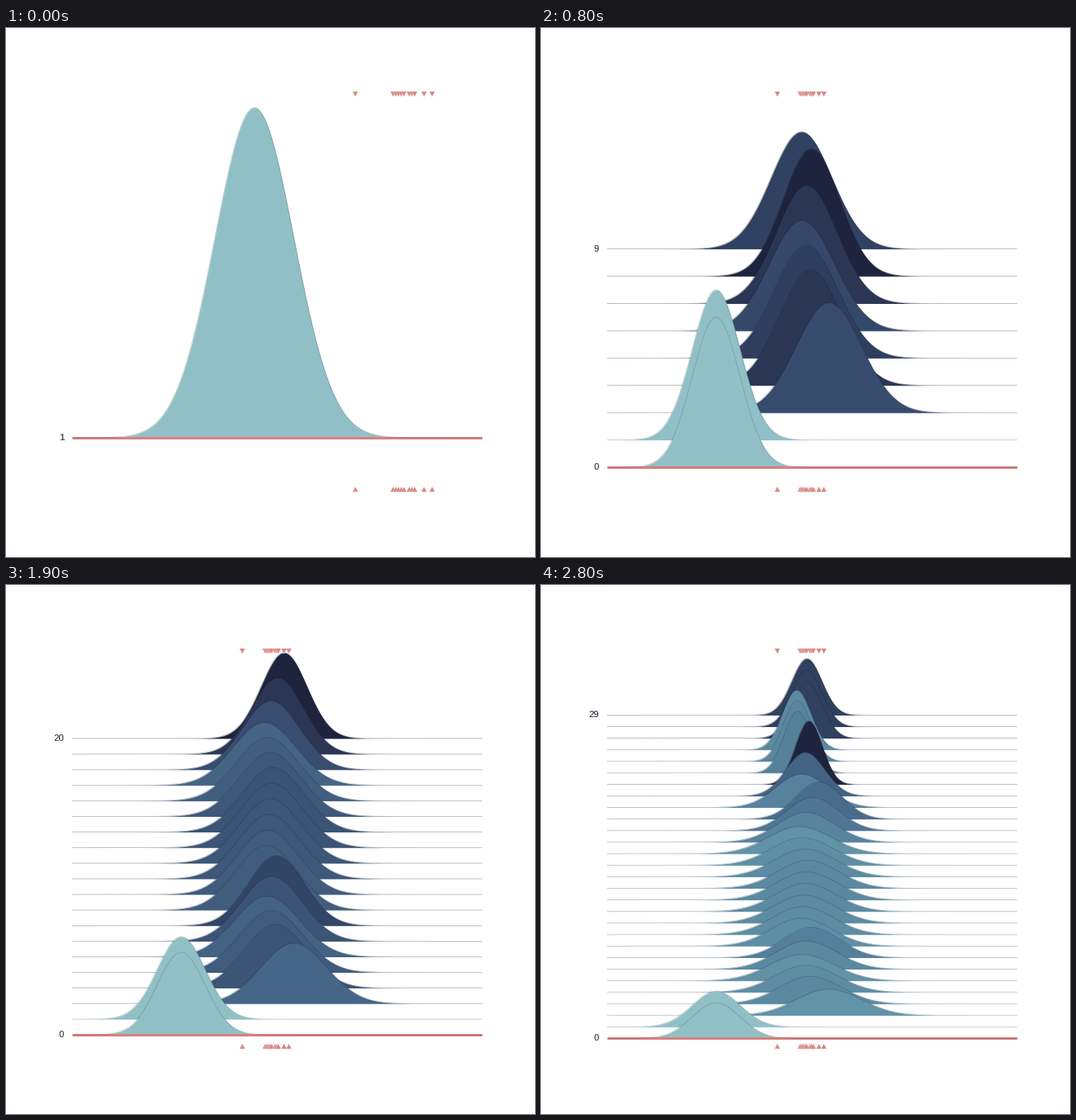
These frames come from a looping animation (648 by 648 pixels, 2.9 s). A matplotlib script:

```python
import numpy as np
import matplotlib.pyplot as plt
from matplotlib.animation import FuncAnimation
from matplotlib.colors import LinearSegmentedColormap

SIZE, STEPS = 648, 29
LEFT, RIGHT = 81, 583.2
TOP, BOTTOM = 77.8, 568.2
OVERLAP = 0.85              # share of each row covered by its neighbour
BASE, PEAK = 0.135, 0.8247  # baseline and tallest peak, as shares of a row
IDEAL = 335                 # ridges dense at this position are dark
FAIR = 0.025                # density below which nothing counts as dark
RED = "#d98782"
INK = "#1c2036"

# Turning points of the search: step, centre, spread
TURNS = np.array([
    (1, 214.5, 29.3), (2, 352.5, 40), (3, 330, 38), (5, 319.5, 39.8),
    (7, 331, 34.5), (8, 319, 37.5), (13, 327, 37.4), (16, 316.5, 38.5),
    (19, 340.5, 28.2), (20, 319, 31.3), (22, 328, 16.5), (23, 314.5, 17),
    (25, 313, 17.5), (26, 325.5, 18.5)])
CENTRES, SPREADS = (np.interp(np.arange(STEPS), TURNS[:, 0], column)
                    for column in TURNS[:, 1:].T)
SCORES = np.exp(-((CENTRES - IDEAL) / SPREADS) ** 2 / 2) / SPREADS

MARKS = np.r_[289.5, 317.5:326:2, 329.5:334:2, 340.5, 346.5]
SHADES = LinearSegmentedColormap.from_list("shades", [
    (0, "#1f243e"), (0.2, "#364a6c"), (0.38, "#4a6d8d"),
    (0.575, "#6091a6"), (1, "#90c0c6")])

plt.rcParams["font.family"] = "Liberation Sans"
fig = plt.figure(figsize=(9, 9), dpi=72, facecolor="white")
ax = fig.add_axes([0, 0, 1, 1])
xs = np.linspace(LEFT, RIGHT, 400)


def view(n):
    """Zoom and offset; the view is closer while only the first group exists."""
    zoom = 1 if n > 2 else 1.65
    return zoom, 304.2 - 214.5 * zoom if n <= 2 else 0


def label(text, y, **style):
    ax.text(71.2, y, text, ha="right", va="center", fontsize=11.2, **style)


def draw_marks(xs_marks):
    for x in xs_marks:
        for edge, tip in ((TOP, TOP + 6.5), (BOTTOM, BOTTOM - 6.5)):
            ax.fill([x - 3.5, x + 3.5, x], [edge, edge, tip], fc=RED,
                    ec="white", lw=0.3, zorder=200)


def draw_ridge(i, y0, ys, color):
    order = 100 - 3 * i
    ax.fill_between(xs, ys, y0, color=color, lw=0, zorder=order)
    if i == 0:
        ax.plot([LEFT, RIGHT], [y0, y0], color="#d97f7e", lw=3,
                solid_capstyle="butt", zorder=order + 1)
    edge = [0.5 * c for c in color[:3]]
    ax.plot(xs, ys, color=edge, lw=0.8, alpha=0.36,
            solid_capstyle="butt", zorder=order + 2)


def draw(step):
    n = step + 1
    ax.clear()
    ax.set(xlim=(0, SIZE), ylim=(SIZE, 0))
    ax.axis("off")

    gap = (BOTTOM - TOP) / (n + OVERLAP / (1 - OVERLAP))
    row = gap / (1 - OVERLAP)
    floor = BOTTOM - BASE * row
    zoom, shift = view(n)
    tones = 1.0 - SCORES[:n] / max(FAIR, SCORES[:n].max())
    heights = PEAK * row * SPREADS[:n].min() / SPREADS[:n]

    for i in range(n):
        y0 = floor - i * gap
        z = ((xs - shift) / zoom - CENTRES[i]) / SPREADS[i]
        draw_ridge(i, y0, y0 - heights[i] * np.exp(-z * z / 2),
                   SHADES(float(tones[i])))

    if n == 1:
        label("1", floor, color="#555555", weight="bold")
    else:
        label("0", floor, color=INK)
        label(str(n), floor - step * gap, color=INK)
    draw_marks(MARKS * zoom + shift)
    return []


anim = FuncAnimation(fig, draw, frames=STEPS, init_func=lambda: [],
                     interval=100, repeat=True, repeat_delay=0)
plt.show()
```
